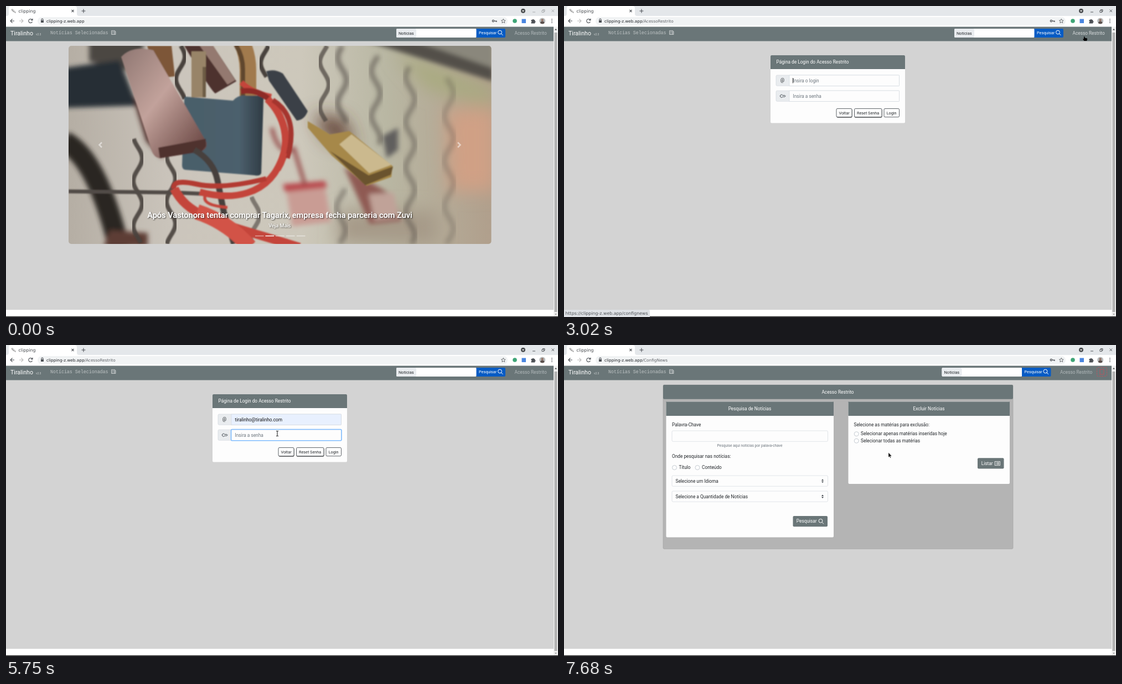
Animation, 997 px wide and 562 px high, one loop 7990 ms. Source, as an HTML page:

```html
<!DOCTYPE html>
<html lang="pt">
<head>
<meta charset="utf-8">
<style>
html, body { margin: 0; height: 100%; overflow: hidden; background: #fff }
svg { display: block; width: 997px; height: 562px }
text { font: 8.31px Roboto, sans-serif; fill: #212529; white-space: pre }
.ui { font-family: "DejaVu Sans", sans-serif }
.w { fill: #fff }
.m { text-anchor: middle }
.sm { font-size: 7.27px }
.hint { fill: #6c757d }
.head { fill: #6a7678 }
.card { fill: #fdfdfd }
.field { fill: #fdfdfd; stroke: #ced4da; stroke-width: .6 }
.addon { fill: #e9ecef; stroke: #ced4da; stroke-width: .6 }
.btn { fill: #fff; stroke: #343a40; stroke-width: .8 }
.line { fill: none; stroke: currentColor }
.ring { fill: none; stroke: #80bdff; stroke-width: 1.6 }
</style>
</head>
<body>
<svg viewBox="0 0 997 562">
<defs>
  <clipPath id="frame"><rect x="113" y="72" width="763.500" height="358" rx="5"/></clipPath>
  <linearGradient id="sky"><stop stop-color="#b5aea4"/><stop offset=".25" stop-color="#cbc5bc"/><stop offset=".55" stop-color="#cdc8bb"/><stop offset=".75" stop-color="#b9b7a3"/><stop offset="1" stop-color="#b09f8c"/></linearGradient>
  <linearGradient id="pink" x2="1" y2="1"><stop stop-color="#8f7772"/><stop offset=".45" stop-color="#c2a29b"/><stop offset="1" stop-color="#5f3b38"/></linearGradient>
  <linearGradient id="steel"><stop stop-color="#4a5e6a"/><stop offset=".7" stop-color="#4c606d"/><stop offset="1" stop-color="#2f3b44"/></linearGradient>
  <filter id="soft" x="-30%" y="-30%" width="160%" height="160%"><feGaussianBlur stdDeviation="4"/></filter>
  <filter id="haze" x="-60%" y="-60%" width="220%" height="220%"><feGaussianBlur stdDeviation="16"/></filter>
  <filter id="edge"><feGaussianBlur stdDeviation=".8"/></filter>
  <filter id="drop" x="-10%" y="-30%" width="120%" height="180%"><feDropShadow dx="1" dy="1" stdDeviation=".8" flood-opacity=".8"/></filter>
  <g id="glass" class="line" stroke-width="1"><circle cx="-1" cy="-1" r="3.400"/><path d="M1.500 1.500L4.500 4.500"/></g>
</defs>

<!-- browser -->
<rect width="997" height="18" fill="#e4e7ea"/>
<path d="M1 18q4 0 4-4V4q0-4 4-4H124q4 0 4 4V14q0 4 4 4z" class="w"/>
<rect y="18" width="997" height="19.500" class="w"/>
<rect x="57" y="20" width="849" height="14.500" rx="7.200" fill="#f1f3f4"/>
<path class="line" color="#999" d="M11 7l5 5q2 1 1-1l-5-5q-2-1-2 1l4 4"/>
<text class="ui" x="22.500" y="11.700" style="font-size:7.900px;fill:#45494d">clipping</text>
<g class="line" color="#4d5156" stroke-width="1.100">
  <path d="M118.500 7l4 4m0-4l-4 4M136.500 9h7m-3.500-3.500v7"/>
  <path d="M15 27H8m3.500-3.500L8 27l3.500 3.500"/>
  <path d="M24 27h7m-3.500-3.500L31 27l-3.500 3.500" stroke="#bbb"/>
  <path d="M47.500 25.500a3.500 3.500 0 1 0 0 3M48 22.800v3h-3"/>
  <path d="M64 26v-1.500a1.500 1.500 0 0 1 3 0V26"/>
  <path d="M898.300 23.300l1.100 2.500 2.700.3-2 1.800.6 2.700-2.400-1.400-2.400 1.400.6-2.700-2-1.800 2.700-.3z" stroke-width=".8"/>
</g>
<rect x="63" y="26" width="5" height="4" fill="#4d5156"/>
<text class="ui" x="73" y="29.700" style="font-size:7.300px">clipping-z.web.app<tspan id="path" fill="#5f6368"></tspan></text>
<g id="key" class="line" color="#4d5156" stroke-width="1.200"><circle cx="880" cy="27" r="1.700"/><path d="M882 27h4v2m-1.500-2v1.500"/></g>
<circle cx="919" cy="27" r="3.800" fill="#3fa577"/>
<rect x="931.500" y="23.500" width="7.500" height="7.500" fill="#4a86e0"/>
<path d="M948.500 25h2.200a1.300 1.300 0 0 1 2.600 0h2v2.200a1.300 1.300 0 0 1 0 2.600v1.700h-6.800v-2a1.300 1.300 0 0 0 0-2.500z" fill="#4d5156"/>
<circle cx="968.700" cy="27" r="5.500" fill="#b9bcbd"/>
<path d="M965 31a3.700 3.500 0 0 1 7.400 0q-3.700 2.500-7.400 0z" fill="#5a4f4c"/><circle cx="968.700" cy="25.500" r="2.200" fill="#94766a"/>
<path d="M986 23.200v1.600m0 1.400v1.600m0 1.400v1.600" stroke="#4d5156" stroke-width="1.500"/>
<circle cx="934" cy="8.800" r="4" fill="#4a4d50"/><path d="M932 8h4l-2 2.500z" class="w"/>
<path id="controls" class="line" d="M951 11h5M968 8h3.500v3.500H968zM969.500 8V6.500H973V10h-1.500M985.500 6.500l4.500 4.500m0-4.500l-4.500 4.500"/>

<!-- page -->
<rect y="63" width="989" height="486" fill="#d3d3d3"/>
<rect y="37.500" width="989" height="26" class="head"/>
<text class="w" x="8" y="52.700" style="font-size:10.600px">Tiralinho</text>
<text x="54" y="52.500" style="font-size:5px;fill:#d4d8d8">v2.3</text>
<text x="80" y="51.300" style="font-family:'Liberation Mono',monospace;fill:#c0c5c6">Notícias Selecionadas</text>
<path class="line" color="#c0c5c6" d="M190.500 44.500h6v7h-6zM196.500 46h1.500v5.500h-2M191.500 46.500h4m-4 2h1.500m1 0h1.500m-4 1.800h1.500m1 0h1.500"/>
<g id="nav">
  <rect x="705" y="41" width="145" height="16" rx="2" class="w"/>
  <rect x="705" y="41" width="36" height="16" rx="2" fill="#e9ecef"/>
  <text x="709" y="51.500" style="font-size:7.500px">Notícias</text>
  <path d="M849.500 41h50.500q2 0 2 2v12q0 2-2 2h-50.500z" fill="#075bc4"/>
  <text class="w sm" x="854" y="51.300">Pesquisar</text>
  <use href="#glass" x="893" y="48.500" color="#fff"/>
  <text id="access" x="918.500" y="51.500">Acesso Restrito</text>
</g>

<g id="carousel">
  <g clip-path="url(#frame)">
    <rect x="113" y="72" width="764" height="358" fill="url(#sky)"/>
    <g filter="url(#haze)">
      <path d="M795 185h90v150h-85z" fill="#d0a085"/>
      <path d="M700 80l180 70v30l-120-30z" fill="#a9aa80"/>
      <path d="M555 195l55 10 20 50-50-15z" fill="#5c3a2d"/>
      <path d="M600 370h180v60h-180z" fill="#a69a88"/>
    </g>
    <g filter="url(#soft)">
      <path d="M640 60h240v72z" fill="#8a877c"/><path d="M640 60h90l150 52v24z" fill="#524f49"/>
      <path d="M150 60h100l-10 60-90-20z" fill="#4b4743"/>
      <path d="M105 112l100-14 32 82-132 4z" fill="#252e35"/>
      <path d="M228 160l52 60 3 56-30-32z" fill="#4c2a28"/>
      <path d="M105 245Q165 275 205 440" fill="none" stroke="#2a2623" stroke-width="38"/>
      <path d="M188 405l68 5v25h-80z" fill="#5d3c35"/>
      <path d="M505 325l70-5 12 70-70 8z" fill="#c99c94"/><path d="M500 322l76-6 4 12-76 8z" fill="#b94a4e"/>
      <path d="M480 220q12 52 40 38l20 65" fill="none" stroke="#97504e" stroke-width="7"/>
      <path d="M610 290l85 50 20 48-58 6z" fill="#8f5a53"/><path d="M655 340l45-3 10 45-45 5z" fill="#c0a298"/>
      <path d="M680 235l28-15v40l-20 15z" fill="#605e5d"/>
    </g>
    <g id="wires" fill="none" stroke="#48423d"></g>
    <g filter="url(#edge)">
      <path d="M113 335l190 2 110 5" fill="none" stroke="#514b46" stroke-width="7"/>
      <path d="M255 72h44l6 55-32 4z" fill="#7d5639"/>
      <path d="M322 72h52l42 64-38 22q-8-5-56-86z" fill="#4d302e"/><path d="M350 72h24l40 62-14 8z" fill="#94796f"/>
      <path d="M470 118q15-5 30 4l45 68q-6 16-20 17l-50-72z" fill="#3b4147"/>
      <path d="M348 165V82" stroke="#988468" stroke-width="26"/><path d="M358 165V110" stroke="#6d5b45" stroke-width="6"/>
      <path d="M437 165V115Q437 88 424 60" stroke="#a17a4d" stroke-width="30" fill="none"/><path d="M428 165V115Q428 90 415 70" stroke="#61462f" stroke-width="8" fill="none"/>
      <path d="M326 164l84 7q10-12 26-9l26 0q4 2 3 8l-4 132q-2 6-12 4l-125-10q-6-1-6-8l4-120q0-5 4-4z" fill="url(#steel)"/>
      <path d="M208 92q20-22 58-12l96 166q2 14-10 16l-75 13q-10-2-14-14z" fill="url(#pink)"/>
      <path d="M275 256l86-16v13l-8 10-75 12z" fill="#4f302e"/>
      <path d="M340 260q35 20 42 55t12 60l18 55" fill="none" stroke="#47413d" stroke-width="11"/>
      <path d="M545 208l40 24 35-6 78 63-2 20-45 16-63-55-43-50z" fill="#a68848"/><path d="M602 250l22-18 72 55-40 15z" fill="#cbb98e"/><path d="M585 262l70 44 44-16-4 15-46 19z" fill="#6a532d"/>
      <g fill="none" stroke="#c4443a">
        <path d="M425 138q18 18 54 26" stroke-width="10"/><path d="M424 154q30-4 50 14" stroke="#8e2b28" stroke-width="10"/>
        <path d="M472 168C500 195 520 245 490 295" stroke-width="13"/><path d="M482 170Q530 200 508 275" stroke="#a5342e" stroke-width="9"/>
        <path d="M502 265C478 350 400 350 350 336" stroke-width="12"/><path d="M470 312Q390 332 345 322T303 330" stroke="#b33b33" stroke-width="9"/>
        <path d="M304 330C330 385 400 395 530 436" stroke-width="16"/><path d="M345 372Q400 390 440 435" stroke="#d25347" stroke-width="28"/>
        <path d="M360 342Q352 360 400 364" stroke-width="5"/>
      </g>
    </g>
  </g>
  <g class="line" color="#fff" stroke-width="2.600"><path id="prev" d="M173 246.500l-4.500 4.500 4.500 4.500"/><path id="next" d="M816 246.500l4.500 4.500-4.500 4.500"/></g>
  <g filter="url(#drop)">
    <text class="w m" x="494.500" y="382.500" style="font-size:14.540px;font-weight:500">Após Vastonora tentar comprar Tagarix, empresa fecha parceria com Zuvi</text>
    <text class="w m" x="494.500" y="400" style="font:500 9px 'Noto Sans',sans-serif">Veja Mais</text>
  </g>
  <path d="M450 415.500h15.500m21.500 0h15.500m3.500 0h15.500m3.500 0h15.500" stroke="#fff" stroke-width="1.500" opacity=".5"/>
  <path d="M468.500 415.500h15.500" stroke="#fff" stroke-width="1.500"/>
</g>

<g id="login">
  <rect x="373" y="89" width="243" height="122.500" rx="2" class="card"/>
  <path d="M373 114V91q0-2 2-2h239q2 0 2 2v23z" class="head"/>
  <text class="w" x="383.500" y="103.800">Página de Login do Acesso Restrito</text>
  <rect x="383" y="125" width="222.500" height="19.300" rx="2" class="addon"/>
  <rect x="383" y="153" width="222.500" height="19.300" rx="2" class="addon"/>
  <rect id="user" x="407" y="125" width="198.500" height="19.300" class="field"/>
  <rect x="407" y="153" width="198.500" height="19.300" class="field"/>
  <text class="m" x="394.500" y="137.300" fill="#495057">@</text>
  <path class="line" color="#495057" d="M395 161.500a2.500 2.500 0 1 0 0 2.500h4l1-1.300-1-1.200zM391.500 162.700h.5"/>
  <text id="userText" x="413.500" y="137.500"></text>
  <text id="passText" x="413.500" y="165.500"></text>
  <rect id="ring1" x="406.500" y="124.500" width="199.500" height="20.300" rx="2" class="ring"/>
  <rect id="ring2" x="406.500" y="152.500" width="199.500" height="20.300" rx="2" class="ring"/>
  <rect id="caret" width=".8" height="9.500"/>
  <g id="others">
    <rect x="492.500" y="186.300" width="28" height="15.500" rx="2" fill="#555"/><rect x="524.500" y="186.300" width="50" height="15.500" rx="2" fill="#555"/>
    <rect x="492" y="185.400" width="28" height="15.300" rx="2" class="btn"/><rect x="524.500" y="185.400" width="49.500" height="15.300" rx="2" class="btn"/>
    <text class="sm" x="496.500" y="195.500">Voltar</text><text class="sm" x="529" y="195.500">Reset Senha</text>
  </g>
  <rect id="glow" x="567" y="184" width="39.500" height="18" rx="3" fill="#8b8f93"/>
  <rect id="enter" y="185.400" height="15.300" rx="2" class="btn"/>
  <text id="enterText" class="sm" y="195.500">Login</text>
  <path id="spin" class="line" color="#fff" stroke-width="1.100" d="M0-3.800A3.800 3.800 0 1 0 3.800 0"/>
  <g id="menu">
    <rect x="407" y="145.500" width="200" height="121" rx="2" fill="#aaa"/>
    <rect x="406.500" y="145" width="199.500" height="120.500" rx="2" fill="#fdfdfd" stroke="#bbb" stroke-width=".5"/>
    <rect id="pick" x="407" width="198.500" height="18.700" fill="#e4e5e6"/>
  </g>
</g>

<g id="admin">
  <rect x="179" y="72" width="632" height="296.500" rx="2" fill="#b4b4b4" stroke="#a3a3a3" stroke-width=".6"/>
  <rect x="179" y="72" width="632" height="25.700" rx="2" class="head"/>
  <rect x="184.500" y="102.500" width="302.500" height="245" rx="2" class="card"/>
  <rect x="513.500" y="102.500" width="291.500" height="148.500" rx="2" class="card"/>
  <path d="M184.500 102.500H487V128H184.500zM513.500 102.500H805V128H513.500z" class="head"/>
  <g class="m"><text class="w" x="494.500" y="87.500">Acesso Restrito</text><text class="w" x="335.500" y="117.500">Pesquisa de Notícias</text><text class="w" x="659" y="117.500">Excluir Notícias</text>
  <text class="hint" x="335.500" y="184.200" style="font-size:6.650px">Pesquise aqui notícias por palava-chave</text></g>
  <rect x="195" y="155" width="281.500" height="19.300" rx="2" class="field"/>
  <rect x="195" y="236" width="281.500" height="19.300" rx="2" class="field"/>
  <rect x="195" y="264" width="281.500" height="19.300" rx="2" class="field"/>
  <path d="M465 245l2-2.500 2 2.500zm0 1.500l2 2.500 2-2.500zM465 273l2-2.500 2 2.500zm0 1.500l2 2.500 2-2.500z" fill="#343a40"/>
  <text x="195" y="147">Palavra-Chave</text>
  <text x="195" y="203.800">Onde pesquisar nas notícias:</text>
  <text x="207.500" y="224">Título</text><text x="249" y="224">Conteúdo</text>
  <text x="201.500" y="248.500">Selecione um Idioma</text>
  <text x="201.500" y="276.500">Selecione a Quantidade de Notícias</text>
  <text x="523.500" y="147">Selecione as matérias para exclusão:</text>
  <text x="536" y="163.300">Selecionar apenas matérias inseridas hoje</text>
  <text x="536" y="175.800">Selecionar todas as matérias</text>
  <g fill="#fff" stroke="#adb5bd" stroke-width=".7"><circle cx="199.500" cy="221.500" r="4"/><circle cx="241" cy="221.500" r="4"/><circle cx="528.200" cy="160.700" r="4"/><circle cx="528.200" cy="173.200" r="4"/></g>
  <rect x="413.500" y="309" width="62.500" height="19.300" rx="2" class="head"/><text class="w" x="419.800" y="321.300">Pesquisar</text>
  <use href="#glass" x="464.500" y="318.800" color="#fff"/>
  <rect x="747" y="204.300" width="47.500" height="19.300" rx="2" class="head"/><text class="w" x="753.800" y="216.500">Listar</text>
  <path class="line" color="#fff" stroke-width=".8" d="M778 210.500h9.500v7H778zM780 212.500h1m1 0h4m-6 1.500h1m1 0h4m-6 1.500h1m1 0h4"/>
  <g class="line" color="#c8505c" stroke-width=".8"><rect x="962.500" y="40.500" width="18" height="16" rx="2" stroke-dasharray="3 1.500"/><path d="M968 44h7v9h-7zm4.500 4.500h.5"/></g>
</g>

<rect x="989" y="37.500" width="8" height="524" fill="#f1f1f1"/>
<rect x="990.500" y="48" width="5" height="505" fill="#b2b2b2"/>
<path d="M991 43.500l2-2.500 2 2.500z" fill="#444"/><path d="M991 556l2 2.500 2-2.500z" fill="#999"/>
<rect y="560.800" width="997" height="1.200" fill="#222"/>
<g id="status"><path d="M0 549h153q2 0 2 2v11H0z" fill="#dee1e6"/><text class="ui" x="2.500" y="558" style="font-size:7.860px;fill:#4d5156">https://clipping-z.web.app/confignews</text></g>

<g id="cursor">
  <path id="arrow" d="M0 0v8.500l2-1.800 1.300 3 1.200-.6-1.300-2.800H6z" stroke="#fff" stroke-width=".4"/>
  <path id="hand" d="M-1 1.500q.6-1 1.500 0V3.500l4.500 1V7L4 9H-.5L-2.500 6.500v-1.500l1.500.5z"/>
  <path id="beam" class="line" color="#111" d="M-2-4.500h1.500l.5.500.5-.5H2M0-4v8M-2 4.500h1.500L0 4l.5.500H2"/>
</g>
</svg>
<script>
const $ = id => document.getElementById(id);
const set = (id, attrs) => { for (const k in attrs) $(id).setAttribute(k, attrs[k]); };
const show = (id, on) => set(id, { opacity: +on });
const clamp = v => Math.max(0, Math.min(1, v));
const LOOP = 7990, STEP = 93, LOGIN = 3020, PICK = 4880, PASS = 5250, TYPED = 6140, SUBMIT = 6920, ADMIN = 7680;
const fade = (t, from, to) => clamp((t - from) / 150) * clamp(1 - (t - to) / 150);
const mails = ['me@otavio-bramante.codes', 'tiralinho@tiralinho.com', 'modelo@zuvo.com',
  'lorena@vumel.com', 'otaviobrm@vumel.com', 'guarimbal'];
const rowTop = i => 149.5 + 18.7 * i;

$('menu').innerHTML += mails.map((m, i) =>
  `<text class="ui" x="413" y="${rowTop(i) + 12}" style="font-size:8.2px">${m}</text>`).join('');

// wavy fence: x, top, bottom, opacity
$('wires').innerHTML = [[315, 72, 170, 1], [238, 240, 430, .9], [298, 270, 430, .9], [468, 72, 130, 1],
  [575, 72, 210, .7], [607, 72, 215, .7], [668, 90, 250, .6], [730, 110, 430, .5], [450, 345, 430, .6],
  [605, 330, 430, .5], [800, 130, 430, .3]]
  .map(([x, top, end, alpha]) => {
    let d = '';
    for (let y = top; y <= end; y += 4) d += `${d ? 'L' : 'M'}${x + 8 * Math.sin(y / 13 + x)} ${y}`;
    return `<path d="${d}" stroke-width="8" opacity="${alpha}" filter="url(#${x > 590 ? 'soft' : 'edge'})"/>`;
  }).join('');

// start time, number of steps, destination
const moves = [[1220, 9, 831, 215], [2070, 1, 844, 197], [2165, 7, 940, 54], [3115, 6, 532, 135],
  [4080, 8, 500, 181], [4880, 3, 490, 160], [6340, 5, 586, 194.5]];
function pointer(t) {
  let x = 0, y = 301;
  for (const [start, n, toX, toY] of moves) {
    if (t < start) break;
    const p = clamp((Math.floor((t - start) / STEP) + 1) / n), e = p * p * (3 - 2 * p);
    x += (toX - x) * e;
    y += (toY - y) * e;
  }
  return [x, y];
}

function draw(t) {
  const [x, y] = pointer(t);
  const inside = (l, top, r, b) => x >= l && x <= r && y >= top && y <= b;
  const home = t < LOGIN, admin = t >= ADMIN, form = !home && !admin, busy = t >= SUBMIT;
  const menu = t >= 3800 && t < PICK;
  show('carousel', home); show('login', form); show('admin', admin);
  $('path').textContent = home ? '' : admin ? '/ConfigNews' : '/AcessoRestrito';
  set('nav', { transform: `translate(${admin ? -22.5 : 0})` });
  set('controls', { color: t < 2920 ? '#a9acaf' : '#55585c' });
  show('key', t < PICK || t >= TYPED);
  show('status', t >= 2920 && t < 3210);

  const onLink = !admin && inside(914, 42, 981, 60);
  const onPrev = home && t >= 1220 && inside(113, 72, 227, 430), onNext = home && inside(762, 72, 876, 430);
  $('access').style.fill = onLink ? '#d8dcdd' : '#b3babc';
  set('prev', { opacity: onPrev ? .9 : .5 });
  set('next', { opacity: onNext ? .95 : .5 });

  const row = menu && y > rowTop(0) ? Math.floor((y - rowTop(0)) / 18.7) : -1;
  const mail = t >= PICK ? mails[1] : mails[row];
  show('menu', menu); show('pick', row >= 0);
  set('pick', { y: rowTop(Math.max(row, 0)) });
  $('userText').textContent = mail || 'Insira o login';
  $('userText').style.fill = mail ? '#111' : '#6c757d';
  $('user').style.fill = mail ? '#e8f0fe' : '#fdfdfd';
  $('passText').textContent = t < TYPED ? 'Insira a senha' : '••••••';
  $('passText').style.fill = t < TYPED ? '#6c757d' : '#343a40';
  show('ring1', fade(t, LOGIN, PASS)); show('ring2', fade(t, PASS, SUBMIT));

  const typed = t >= TYPED, since = typed ? TYPED : t >= PASS ? PASS : LOGIN;
  show('caret', (t < 3600 || t >= PASS) && !busy && (t - since) % 1000 < 500);
  set('caret', { x: typed ? 431 : 413.2, y: t < PASS ? 130 : 158 });

  const onLogin = form && t > 6340 && inside(578, 185, 606, 201);
  const dark = busy || onLogin;
  set('others', { transform: `translate(${busy ? -10 : 0})` });
  set('enter', { x: busy ? 568.3 : 578, width: busy ? 37 : 27.5 });
  set('enterText', { x: busy ? 573 : 582.7 });
  $('enter').style.fill = dark ? '#343a40' : '#fff';
  $('enterText').style.fill = dark ? '#fff' : '#212529';
  show('glow', busy); show('spin', busy);
  set('spin', { transform: `translate(596.5 193) rotate(${(t - SUBMIT) * .48})` });

  const onField = form && !(menu && y > 145) && (inside(407, 125, 605, 144) || inside(407, 153, 605, 172));
  const onHand = onLink || onPrev || onNext || onLogin;
  set('cursor', { transform: `translate(${x} ${y})`, opacity: +(t >= 1220) });
  show('beam', onField); show('hand', onHand); show('arrow', !onField && !onHand);
}

function tick() {
  draw(performance.now() % LOOP);
  requestAnimationFrame(tick);
}
tick();
</script>
</body>
</html>
```
